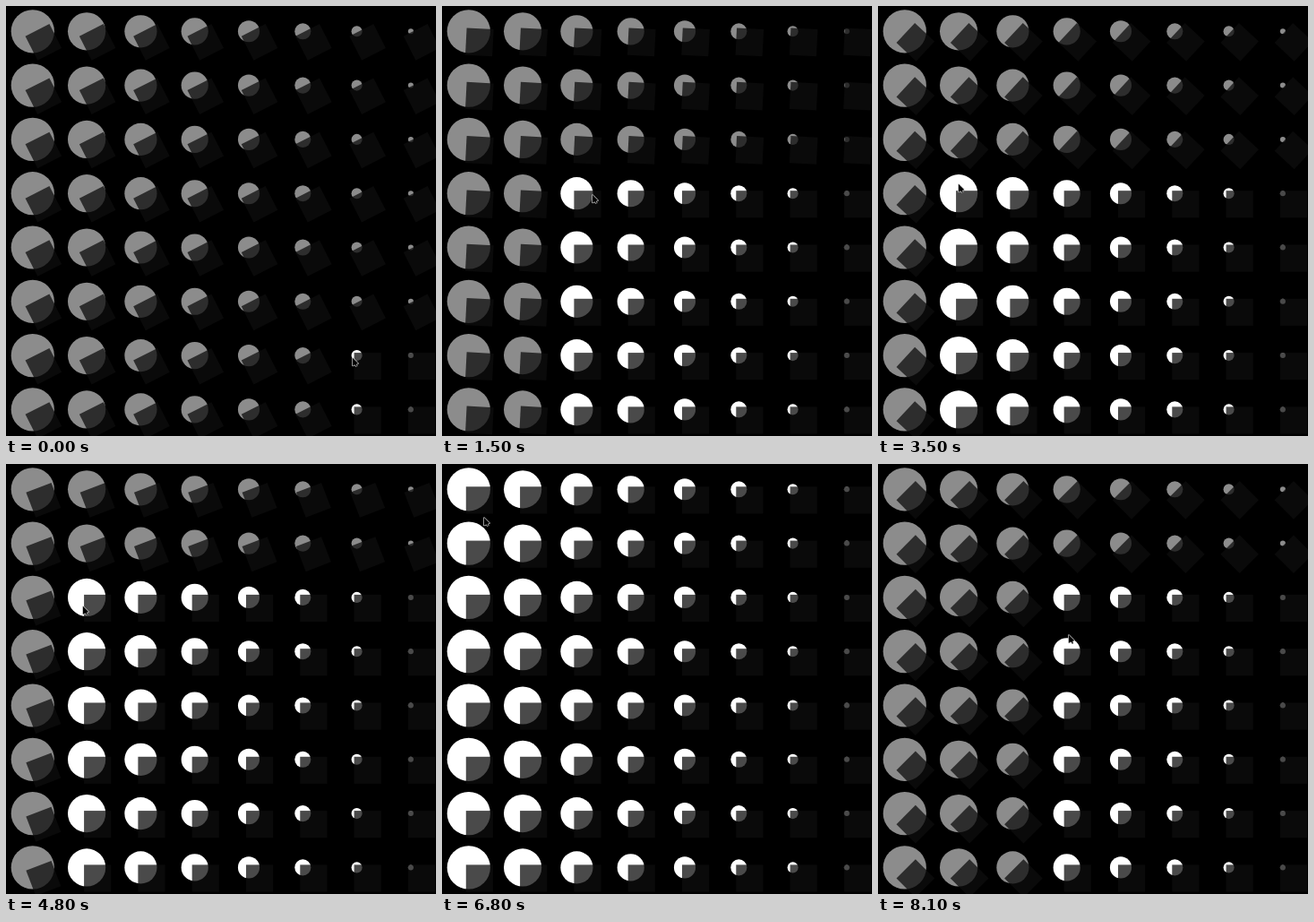
Animation, 480 px wide and 480 px high, one loop 8.2 s. Source, as an HTML page with a canvas:

```html
<!DOCTYPE html>
<html lang="en">
<head>
<meta charset="utf-8">
<title>Circle grid</title>
<style>
  html, body { margin: 0; width: 100%; height: 100%; overflow: hidden; background: #000; }
  canvas { display: block; width: 480px; height: 480px; }
</style>
</head>
<body>
<canvas id="stage" width="480" height="480"></canvas>
<script>
const ctx = document.getElementById('stage').getContext('2d');
const LOOP = 8200, STEP = 100;
const COUNT = 8, PITCH = 60.3;
const RADIUS = PITCH * 0.4, SIDE = PITCH / 2, SHIFT = PITCH / 5;
const REACH = 46;

// key points of the pointer's walk
const WALK = [
  { t: 0, x: 387, y: 393 },
  { t: 1500, x: 168, y: 211 },
  { t: 2300, x: 160, y: 211 },
  { t: 3500, x: 90, y: 199 },
  { t: 4800, x: 86, y: 159 },
  { t: 6800, x: 47, y: 60 },
  { t: 8100, x: 213, y: 191 }
];

const mix = (a, b, k) => a + (b - a) * k;
const ease = k => k * k * (3 - 2 * k);

function pointerAt(t) {
  const next = Math.max(1, WALK.findIndex(p => p.t >= t));
  const a = WALK[next - 1], b = WALK[next];
  const k = ease((t - a.t) / (b.t - a.t));
  return { x: mix(a.x, b.x, k), y: mix(a.y, b.y, k) };
}

function drawCell(col, row, mouse, angle) {
  const x = 29.8 + col * PITCH, y = 28.3 + row * PITCH;
  const lit = mouse.x < x + REACH && mouse.y < y + REACH;

  ctx.fillStyle = lit ? '#fff' : '#8c8c8c';
  ctx.beginPath();
  ctx.arc(x, y, RADIUS * (1 - col / COUNT), 0, Math.PI * 2);
  ctx.fill();

  ctx.save();
  ctx.translate(x + SHIFT, y + SHIFT);
  if (!lit) ctx.rotate(angle);
  ctx.fillStyle = 'rgba(14, 14, 14, 0.75)';
  ctx.fillRect(-SIDE / 2, -SIDE / 2, SIDE, SIDE);
  ctx.restore();
}

// an arrow head with a short tail, painted as a light rim and a dark core
function drawPointer({ x, y }) {
  const head = new Path2D('M0 0V8.5L6 6Z');
  const tail = new Path2D('M2.5 5L4.4 9.4');
  const paint = (color, rim) => {
    ctx.strokeStyle = ctx.fillStyle = color;
    ctx.lineWidth = rim;
    ctx.stroke(head);
    ctx.lineWidth = rim + 1;
    ctx.stroke(tail);
    ctx.fill(head);
  };
  ctx.save();
  ctx.translate(x, y);
  ctx.lineJoin = 'round';
  paint('#ccc', 1.6);
  paint('#000', 0.2);
  ctx.restore();
}

function draw(t) {
  const tick = Math.floor(t / STEP);
  const mouse = pointerAt(tick * STEP);
  const angle = (63 + 2 * tick) * Math.PI / 180;
  ctx.fillStyle = '#000';
  ctx.fillRect(0, 0, 480, 480);
  for (let col = 0; col < COUNT; col++) {
    for (let row = 0; row < COUNT; row++) drawCell(col, row, mouse, angle);
  }
  drawPointer(mouse);
}

const start = performance.now();
function loop() {
  draw((performance.now() - start) % LOOP);
  requestAnimationFrame(loop);
}
loop();
</script>
</body>
</html>
```
